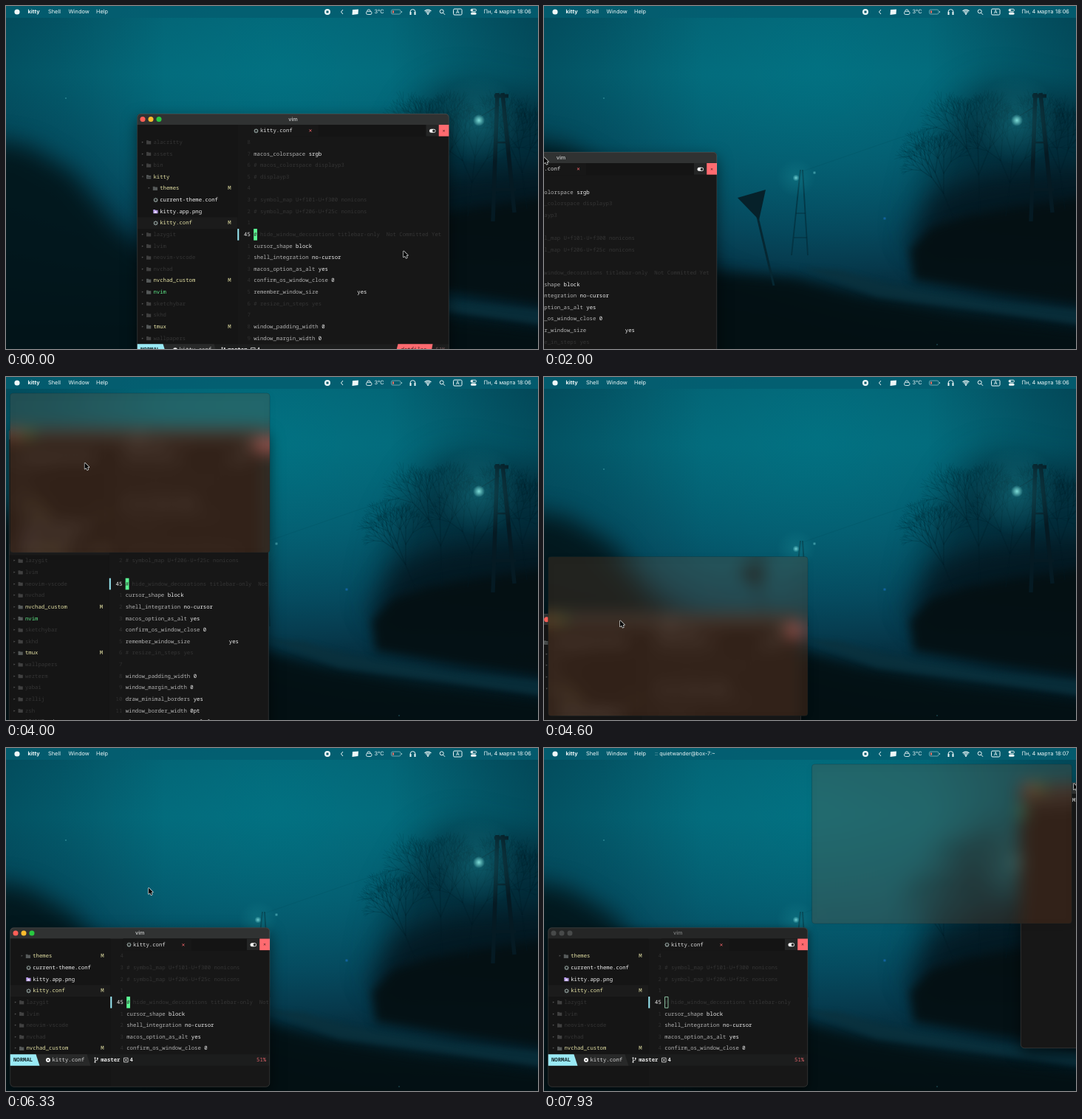
Write an HTML page with a canvas that moves like this. It is 720 px wide and 465 px high and loops after 8 s.

```html
<!DOCTYPE html>
<html lang="en">
<head>
<meta charset="utf-8">
<title>Window tiling</title>
<style>
  html, body { margin: 0; width: 100%; height: 100%; overflow: hidden; background: #04303c; }
  canvas { display: block; width: 720px; height: 465px; }
</style>
</head>
<body>
<canvas id="stage" width="720" height="465"></canvas>
<script>
const W = 720, H = 465, LOOP = 8000;
const COL = 4.38, ROW = 15.63, BAR = 15, ROW_MID = 23.2;
const MONO = '"Noto Sans Mono", "DejaVu Sans Mono", monospace';
const SANS = 'Inter, Roboto, sans-serif';
const HOST = 'quietwander@box-7:~';
const OPEN_AT = 6400, CLOCK_AT = 6600;
const C = {
  bg: '#171717', dim: '#353535', text: '#b4b4b4', white: '#f2f2f2', yellow: '#e6e3a6',
  green: '#5ee787', cyan: '#9aeaf5', red: '#ff6b70', block: '#5cfa94'
};

const stage = document.getElementById('stage');
const ctx = stage.getContext('2d');

function text(str, x, y, color, font, align = 'left') {
  ctx.font = font;
  ctx.fillStyle = color;
  ctx.textAlign = align;
  ctx.fillText(str, x, y);
}
const mono = (str, col, y, color, weight = 400, style = '') =>
  text(str, col * COL, y, color, `${style} ${weight} 7.3px ${MONO}`);

function rect(x, y, w, h, color) {
  ctx.fillStyle = color;
  ctx.fillRect(x, y, w, h);
}
function poly(points, color, g = ctx) {
  g.beginPath();
  points.forEach(([x, y]) => g.lineTo(x, y));
  g.closePath();
  g.fillStyle = color;
  g.fill();
}
function line(points, color, width = 1, g = ctx) {
  g.beginPath();
  points.forEach(([x, y]) => g.lineTo(x, y));
  g.strokeStyle = color;
  g.lineWidth = width;
  g.stroke();
}
function disc(x, y, r, color, g = ctx) {
  g.beginPath();
  g.arc(x, y, r, 0, 7);
  g.fillStyle = color;
  g.fill();
}
function ring(x, y, r, color, width = 1, from = 0, to = 7) {
  ctx.beginPath();
  ctx.arc(x, y, r, from, to);
  ctx.strokeStyle = color;
  ctx.lineWidth = width;
  ctx.stroke();
}
function rounded(x, y, w, h, r) {
  ctx.beginPath();
  ctx.roundRect(x, y, w, h, r);
}
function makeLayer(width, height) {
  const layer = document.createElement('canvas');
  layer.width = width;
  layer.height = height;
  return layer;
}

// Eased position on a list of [time, ...values].
function track(keys, t) {
  const i = keys.findIndex(k => k[0] > t);
  if (i === 0) return keys[0].slice(1);
  if (i < 0) return keys[keys.length - 1].slice(1);
  const a = keys[i - 1], b = keys[i];
  const u = (t - a[0]) / (b[0] - a[0]), e = u * u * (3 - 2 * u);
  return a.slice(1).map((v, n) => v + (b[n + 1] - v) * e);
}

// ---------- wallpaper ----------
function paintWallpaper() {
  const layer = makeLayer(W, H), g = layer.getContext('2d');
  const fill = (gradient, stops) => {
    stops.forEach(([at, color]) => gradient.addColorStop(at, color));
    g.fillStyle = gradient;
    g.fillRect(0, 0, W, H);
  };
  const glow = (x, y, r, color) =>
    fill(g.createRadialGradient(x, y, 0, x, y, r), [[0, color], [1, color.replace(/[\d.]+\)$/, '0)')]]);
  const soft = (blur, points, color) => {
    g.filter = `blur(${blur}px)`;
    poly(points, color, g);
    g.filter = 'none';
  };

  fill(g.createLinearGradient(0, 0, 0, H), [
    [0, '#045f70'], [.2, '#046879'], [.45, '#05566a'], [.65, '#064358'], [.76, '#06374a'], [.9, '#04222d'], [1, '#03141a']]);
  glow(370, 80, 300, 'rgba(0,122,138,.5)');
  fill(g.createLinearGradient(0, 0, W, 0), [
    [0, 'rgba(0,25,40,.28)'], [.3, 'rgba(0,25,40,0)'], [.72, 'rgba(0,25,40,0)'], [1, 'rgba(0,25,40,.34)']]);

  soft(16, [[-40, 178], [30, 190], [90, 225], [150, 300], [240, 365], [330, 395], [560, 490], [-40, 500]], 'rgba(3,20,25,.9)');
  soft(24, [[500, 310], [525, 200], [565, 130], [610, 105], [690, 125], [760, 130], [760, 330]], 'rgba(3,27,38,.55)');
  soft(16, [[490, 320], [530, 255], [590, 230], [760, 215], [760, 340], [520, 350]], 'rgba(4,20,28,.75)');
  soft(9, [[220, 362], [340, 368], [430, 392], [560, 415], [760, 440], [760, 500], [200, 500]], 'rgba(4,17,20,.93)');
  soft(3, [[350, 355], [400, 358], [470, 378], [600, 398], [740, 412], [740, 434], [600, 414], [450, 394]], 'rgba(11,50,62,.75)');
  soft(7, [[495, 330], [525, 300], [575, 284], [640, 272], [740, 258], [740, 408], [620, 392], [500, 372]], 'rgba(5,16,20,.95)');

  let seed = 11;
  const random = () => (seed = seed * 16807 % 2147483647) / 2147483647;
  function branch(x, y, angle, length, depth) {
    const x2 = x + Math.cos(angle) * length, y2 = y + Math.sin(angle) * length;
    line([[x, y], [x2, y2]], 'rgba(3,28,38,.3)', .4 + depth * .22, g);
    if (depth) for (const side of [-1, 0, 1])
      branch(x2, y2, angle + side * (.25 + random() * .3), length * (.62 + random() * .22), depth - 1);
  }
  g.filter = 'blur(.5px)';
  const trees = makeLayer(W, H);
  [[555, 290, -1.95, 38], [590, 285, -1.6, 56], [625, 285, -1.45, 46], [705, 275, -1.7, 50]].forEach(tree => {
    g.filter = 'none';
    branch(...tree, 5);
  });

  g.filter = 'blur(.7px)';
  const pole = '#051a23', far = 'rgba(4,43,56,.65)';
  line([[665, 118], [659, 292]], pole, 5.5, g);
  line([[672, 118], [688, 280]], pole, 5.5, g);
  line([[657, 249], [690, 249]], pole, 4, g);
  line([[663, 185], [678, 185]], pole, 2.5, g);
  line([[661, 122], [680, 122]], pole, 5, g);
  line([[668, 134], [642, 150]], pole, 1, g);
  line([[347, 222], [335, 338]], far, 1.8, g);
  line([[350, 222], [357, 338]], far, 1.8, g);
  line([[341, 281], [354, 281]], far, 1.2, g);
  line([[338, 314], [356, 314]], far, 1.2, g);
  line([[660, 126], [480, 179], [350, 224]], 'rgba(4,45,58,.12)', .8, g);
  line([[289, 286], [311, 379]], '#062732', 3, g);
  poly([[262, 260], [300, 249], [291, 290]], '#06212a', g);
  g.filter = 'none';

  glow(640, 155, 60, 'rgba(30,150,165,.42)');
  glow(640, 155, 8, 'rgba(140,235,228,.9)');
  glow(341, 233, 26, 'rgba(30,145,155,.3)');
  glow(341, 233, 4.5, 'rgba(130,225,225,.85)');
  glow(366, 226, 2.5, 'rgba(110,205,210,.7)');
  glow(461, 288, 2.5, 'rgba(25,110,190,.9)');
  glow(81, 125, 1.5, 'rgba(80,180,185,.7)');
  disc(532, 459, .8, '#27616a', g);
  return layer;
}
const wallpaper = paintWallpaper();

// ---------- menu bar ----------
function drawMenu(t) {
  rect(0, 0, W, 16, 'rgba(4,94,112,.86)');
  const ink = '#eef7f8', font = `400 7.4px ${SANS}`;
  const label = (str, x, f = font) => text(str, x, 8, ink, f);
  disc(15, 8, 3.6, ink);
  label('kitty', 29.5, `700 7.4px ${SANS}`);
  label('Shell', 57);
  label('Window', 84.5);
  label('Help', 122);
  if (t >= OPEN_AT) label(':: ' + HOST, 150, `400 7.2px ${SANS}`);

  disc(435, 8, 4, ink);
  rect(433.5, 6.5, 3, 3, '#075b6c');
  line([[456, 5], [453.5, 8], [456, 11]], ink);
  poly([[469, 5], [477, 4.5], [476.5, 11], [468.5, 12]], ink);
  ring(491, 7, 2.2, ink, .9, Math.PI, Math.PI * 2);
  rounded(487.5, 7.3, 7.5, 4.2, 2);
  ctx.stroke();
  label('3°C', 498.5);
  ctx.lineWidth = .7;
  rounded(521.5, 5, 12.5, 6, 1.8);
  ctx.strokeStyle = '#9cc4ca';
  ctx.stroke();
  rect(523, 6.4, 2, 3.2, '#e96f62');
  rect(535, 7, 1, 2, '#9cc4ca');
  ring(550.5, 8, 3.4, ink, 1, Math.PI, Math.PI * 2);
  rect(546.5, 8, 2, 4, ink);
  rect(552.5, 8, 2, 4, ink);
  [2.4, 4.4, 6.4].forEach(r => ring(571, 11.5, r, ink, 1.2, -2.35, -.8));
  disc(571, 11, 1, ink);
  ring(589.7, 7.3, 2.5, ink);
  line([[591.5, 9.2], [594, 11.8]], ink);
  rounded(605.5, 4, 11.5, 8, 1.5);
  ctx.stroke();
  text('A', 611.2, 8.2, ink, `500 6.5px ${SANS}`, 'center');
  ctx.lineWidth = .9;
  rounded(629, 4.2, 7.5, 3, 1.5);
  ctx.stroke();
  rounded(629, 8.6, 7.5, 3.2, 1.6);
  ctx.fillStyle = ink;
  ctx.fill();
  disc(630.6, 5.7, 1.4, ink);
  label('Пн, 4 марта', 646.5);
  label(t < CLOCK_AT ? '18:06' : '18:07', 692);
}

// ---------- windows ----------
function drawWindow([x, y, w, h], title, focused, drawBody) {
  ctx.save();
  ctx.translate(x, y);
  ctx.save();
  ctx.shadowColor = 'rgba(0,0,0,.55)';
  ctx.shadowBlur = focused ? 20 : 12;
  ctx.shadowOffsetY = focused ? 7 : 3;
  rounded(0, 0, w, h, 5);
  ctx.fillStyle = C.bg;
  ctx.fill();
  ctx.restore();
  ctx.save();
  rounded(0, 0, w, h, 5);
  ctx.clip();
  rect(0, 0, w, BAR, focused ? '#303232' : '#252626');
  ['#ff5f57', '#febc2e', '#28c840'].forEach((color, i) =>
    disc(7.5 + 11 * i, 7.5, 3.5, focused ? color : '#484a4a'));
  text(title, w / 2, 7.7, focused ? '#b9bbbb' : '#747676', `600 7.2px ${SANS}`, 'center');
  drawBody(w, h, focused);
  ctx.restore();
  rounded(.2, .2, w - .4, h - .4, 5);
  ctx.strokeStyle = 'rgba(255,255,255,.17)';
  ctx.lineWidth = .7;
  ctx.stroke();
  ctx.restore();
}

// Each row: icon ("v" open folder, ">" folder, "*" settings, "i" image, "r" readme), depth, tone, name.
const TREE = `v0w~/Developer/dev/dotfiles
>1dalacritty
>1dassets
>1dbin
v1ykitty
>2ythemes
*2wcurrent-theme.conf
i2wkitty.app.png
*2ykitty.conf
>1dlazygit
>1dlvim
>1dneovim-vscode
>1dnvchad
>1ynvchad_custom
>1gnvim
>1dsketchybar
>1dskhd
>1ytmux
>1dwallpapers
>1dwezterm
>1dyabai
>1dzellij
>1dzsh
r1wREADME.md`.split('\n').map(s => ({ icon: s[0], depth: +s[1], tone: s[2], name: s.slice(3) }));
const TONES = { w: C.white, d: C.dim, y: C.yellow, g: C.green };
const MODIFIED = ['themes', 'kitty.conf', 'nvchad_custom', 'tmux'];
const SELECTED = 'kitty.conf';

const CODE = `disable_ligatures|cursor

# box_drawing_scale 4, 4, 4, 4

macos_colorspace srgb
# macos_colorspace displayp3
# displayp3

# symbol_map U+f101-U+f300 nonicons
# symbol_map U+f206-U+f25c nonicons

# hide_window_decorations titlebar-only
cursor_shape block
shell_integration no-cursor
macos_option_as_alt yes
confirm_os_window_close 0
remember_window_size|yes
# resize_in_steps yes

window_padding_width 0
window_margin_width 0
draw_minimal_borders yes
window_border_width 0pt
placement_strategy top-left`.split('\n');
const CURRENT = 11;

function gear(x, y, color) {
  ring(x, y, 2, color, 1.1);
  for (let a = 0; a < 6.2; a += Math.PI / 4)
    rect(x + Math.cos(a) * 2.8 - .4, y + Math.sin(a) * 2.8 - .4, .8, .8, color);
}
function folder(x, y, color) {
  rect(x, y - 2.6, 2.8, 1.2, color);
  rect(x, y - 1.8, 6.2, 4.4, color);
}

function drawTreeRow({ icon, depth, tone, name }, y) {
  if (name === SELECTED) rect(0, y - ROW / 2, 31 * COL, ROW, '#1b1b1b');
  const nameCol = 3 + 2 * depth - (depth === 2 ? 0 : 0), iconX = (nameCol - 2) * COL - .6;
  if ('>v'.includes(icon)) {
    const gray = tone === 'd' ? '#414141' : '#565a5a';
    folder(iconX, y, gray);
    if (icon === 'v') line([[iconX + 1, y + .5], [iconX + 7, y + .5]], '#222', .7);
    if (depth) mono(icon === 'v' ? '▾' : '▸', nameCol - 3.8, y, '#555');
  } else if (icon === '*') {
    gear(iconX + 3.8, y, '#8b9996');
  } else if (icon === 'i') {
    folder(iconX + .5, y, '#b79ae8');
    poly([[iconX + 1.5, y + 2], [iconX + 3.4, y - 1], [iconX + 5.5, y + 2]], '#f0eafd');
  } else {
    rect(iconX - .8, y - 2, 8, 4.2, '#a9d7e8');
    line([[iconX + .5, y + 1], [iconX + 1.5, y - 1], [iconX + 2.5, y + 1]], '#24444f', .8);
  }
  mono(name, nameCol, y, TONES[tone], tone === 'd' ? 400 : 500);
  if (MODIFIED.includes(name)) mono('M', 28, y, C.yellow, 500);
}

function drawCodeRow(index, y, focused) {
  const [left, right] = CODE[index].split('|');
  const current = index === CURRENT;
  if (current) {
    rect(31 * COL, y - ROW / 2, 2, ROW, C.cyan);
    mono('45', 33, y, C.white, 500);
    if (focused) {
      rect(36 * COL, y - ROW / 2, COL + .4, ROW, C.block);
      mono('Not Committed Yet', 77, y, C.dim);
    }
  } else {
    const distance = String(Math.abs(index - CURRENT));
    mono(distance, 35 - distance.length, y, '#303030');
  }
  if (left[0] === '#') mono(left, 36, y, C.dim);
  else {
    const [key, value = ''] = left.split(' ');
    mono(key, 36, y, C.text);
    mono(right || value, right ? 68 : 37 + key.length, y, C.white, 500);
  }
  if (current && !focused) {
    ctx.strokeStyle = '#a8e8c0';
    ctx.lineWidth = .8;
    ctx.strokeRect(36 * COL + .4, y - ROW / 2 + .4, COL, ROW - .8);
  }
}

function drawStatus(w, y) {
  const top = y - ROW / 2, bottom = y + ROW / 2;
  rect(0, top, w, ROW, '#1c1d1d');
  poly([[0, top], [104, top], [109, bottom], [0, bottom]], '#282929');
  poly([[0, top], [35, top], [40, bottom], [0, bottom]], C.cyan);
  mono('NORMAL', 1, y, '#12272b', 700);
  disc(51.5, y, 3, C.white);
  disc(51.5, y, 1, '#282929');
  mono('kitty.conf', 13, y, '#d6d6d6');
  const ink = '#e8e8e8';
  line([[115, y - 2], [115, y + 2.5]], ink, .8);
  line([[115, y + 1], [118.3, y], [118.3, y - 2]], ink, .8);
  [[115, -2.7], [115, 2.7], [118.3, -2.2]].forEach(([x, dy]) => disc(x, y + dy, 1, ink));
  mono('master', 28, y, ink, 700);
  ctx.strokeStyle = ink;
  ctx.lineWidth = .8;
  ctx.strokeRect(154, y - 2.8, 5.6, 5.6);
  disc(156.8, y, 1, ink);
  mono('4', 37, y, ink, 700);
  if (w > 400) {
    poly([[w - 69, top], [w - 22, top], [w - 25, bottom], [w - 73, bottom]], C.red);
    mono('dotfiles', (w - 66) / COL, y, '#3a1719', 400, 'italic');
    mono('51%', (w - 18) / COL, y, '#77585a');
  } else mono('51%', (w - 18) / COL, y, '#e0636a');
}

function drawVim(w, h, focused) {
  const status = Math.floor((h - 14.5) / ROW) - 2, visible = status - 1;
  const rowY = row => ROW_MID + row * ROW;
  rect(0, BAR, 31 * COL, h, '#151515');
  rect(35 * COL, BAR, w, ROW + .5, '#141414');
  rect(35 * COL, BAR, 21 * COL, ROW + .5, C.bg);
  gear(161, rowY(0), '#8b9996');
  mono('kitty.conf', 38, rowY(0), '#dedede', 500);
  mono('✕', 53, rowY(0), C.red);
  rect(w - 31, BAR, 17, ROW, '#242525');
  rounded(w - 26.5, rowY(0) - 2.5, 8.5, 5, 2.5);
  ctx.fillStyle = C.white;
  ctx.fill();
  disc(w - 20.5, rowY(0), 1.8, '#242525');
  rect(w - 13.8, BAR, 14, ROW, C.red);
  text('✕', w - 7, rowY(0), '#431b1d', `400 6px ${MONO}`, 'center');

  const firstTree = Math.max(0, Math.floor(10 - visible / 2));
  const firstCode = CURRENT - Math.ceil(visible / 2) + 1;
  for (let row = 1; row <= visible; row++) {
    const entry = TREE[firstTree + row - 1], index = firstCode + row - 1;
    if (entry) drawTreeRow(entry, rowY(row));
    if (index in CODE) drawCodeRow(index, rowY(row), focused);
  }
  drawStatus(w, rowY(status));
}

function drawShell() {
  mono('Last login: Mon Mar  4 18:05:24 on ttys008', 0, ROW_MID + .3, '#e6e6e6');
  rect(0, ROW_MID + ROW / 2, COL + .2, ROW, C.block);
}

// ---------- drop zone ----------
const MARGIN = 40;
const mirror = makeLayer(W + 2 * MARGIN, H + 2 * MARGIN);

// Copies a part of the stage with reflected borders, so that a blur keeps its edges filled.
function copyMirrored(x, y, w, h) {
  const g = mirror.getContext('2d');
  g.clearRect(0, 0, mirror.width, mirror.height);
  for (const i of [-1, 0, 1]) for (const j of [-1, 0, 1]) {
    g.setTransform(i ? -1 : 1, 0, 0, j ? -1 : 1, MARGIN + (i > 0 ? 2 * w : 0), MARGIN + (j > 0 ? 2 * h : 0));
    g.drawImage(stage, x, y, w, h, 0, 0, w, h);
  }
  g.resetTransform();
}

function drawZone([x, y, w, h, alpha]) {
  if (alpha <= 0) return;
  copyMirrored(Math.round(x), Math.round(y), Math.round(w), Math.round(h));
  ctx.save();
  ctx.globalAlpha = alpha;
  rounded(x, y, w, h, 4);
  ctx.save();
  ctx.clip();
  ctx.filter = 'blur(11px)';
  ctx.drawImage(mirror, Math.round(x) - MARGIN, Math.round(y) - MARGIN);
  ctx.filter = 'none';
  rect(x, y, w, h, 'rgba(160,80,35,.2)');
  ctx.restore();
  ctx.shadowColor = 'rgba(0,0,0,.6)';
  ctx.shadowBlur = 8;
  ctx.shadowOffsetY = 2;
  rounded(x, y, w, h, 4);
  ctx.strokeStyle = 'rgba(20,40,42,.35)';
  ctx.lineWidth = .7;
  ctx.stroke();
  ctx.restore();
}

function drawPointer([x, y]) {
  const shape = [[0, 0], [0, 8.4], [2, 6.7], [3.4, 9.8], [4.9, 9.1], [3.5, 6.2], [6, 6]]
    .map(([dx, dy]) => [x + dx, y + dy]);
  ctx.lineJoin = 'round';
  line([...shape, shape[0]], '#e4e8e8', 1.3);
  poly(shape, '#000');
}

// ---------- motion ----------
const LEFT_HALF = [5.5, 22, 351.5, 437];
const TOP_LEFT = [5.5, 22, 351.5, 216];
const BOTTOM_LEFT = [5.5, 243.5, 351.5, 216];
const TOP_RIGHT = [362.5, 22, 352, 216];
const START = [177.5, 146, 422, 346], AT_EDGE = [-188, 198, 422, 346];
const DROPPED = [-4, 326, 351.5, 437];

const POINTER = [
  [150, 538, 332], [950, 365, 153], [1100, 365, 153], [1850, 0, 205], [2500, 0, 205], [3150, 108, 21],
  [3680, 108, 26], [4569, 103, 330], [4850, 103, 330], [5480, 192, 190], [6300, 192, 190],
  [7000, 352, 106], [7220, 352, 106], [7780, 717, 48]];
const VIM = [
  [1198, ...START], [1948, ...AT_EDGE], [2480, ...AT_EDGE], [2481, ...LEFT_HALF],
  [3778, ...LEFT_HALF], [4667, ...DROPPED], [4820, ...DROPPED], [4821, ...BOTTOM_LEFT]];
const SHELL = [[7260, 267, 98.5, 275, 360], [7860, 645, 47, 275, 360]];
const ZONE = [
  [2050, ...LEFT_HALF, 0], [2150, ...LEFT_HALF, 1], [2460, ...LEFT_HALF, 1], [2540, ...LEFT_HALF, 0],
  [3760, ...TOP_LEFT, 0], [3860, ...TOP_LEFT, 1], [4250, ...TOP_LEFT, 1], [4370, ...BOTTOM_LEFT, 1],
  [4800, ...BOTTOM_LEFT, 1], [4880, ...BOTTOM_LEFT, 0],
  [4881, ...TOP_RIGHT, 0], [7780, ...TOP_RIGHT, 0], [7860, ...TOP_RIGHT, 1]];

function draw(now) {
  const t = now % LOOP, shellOpen = t >= OPEN_AT;
  ctx.textBaseline = 'middle';
  ctx.textRendering = 'geometricPrecision';
  ctx.drawImage(wallpaper, 0, 0);
  drawWindow(track(VIM, t), 'vim', !shellOpen, drawVim);
  if (shellOpen) drawWindow(track(SHELL, t), HOST, true, drawShell);
  drawZone(track(ZONE, t));
  drawMenu(t);
  drawPointer(track(POINTER, t));
  requestAnimationFrame(() => draw(performance.now()));
}
draw(0);
</script>
</body>
</html>
```
